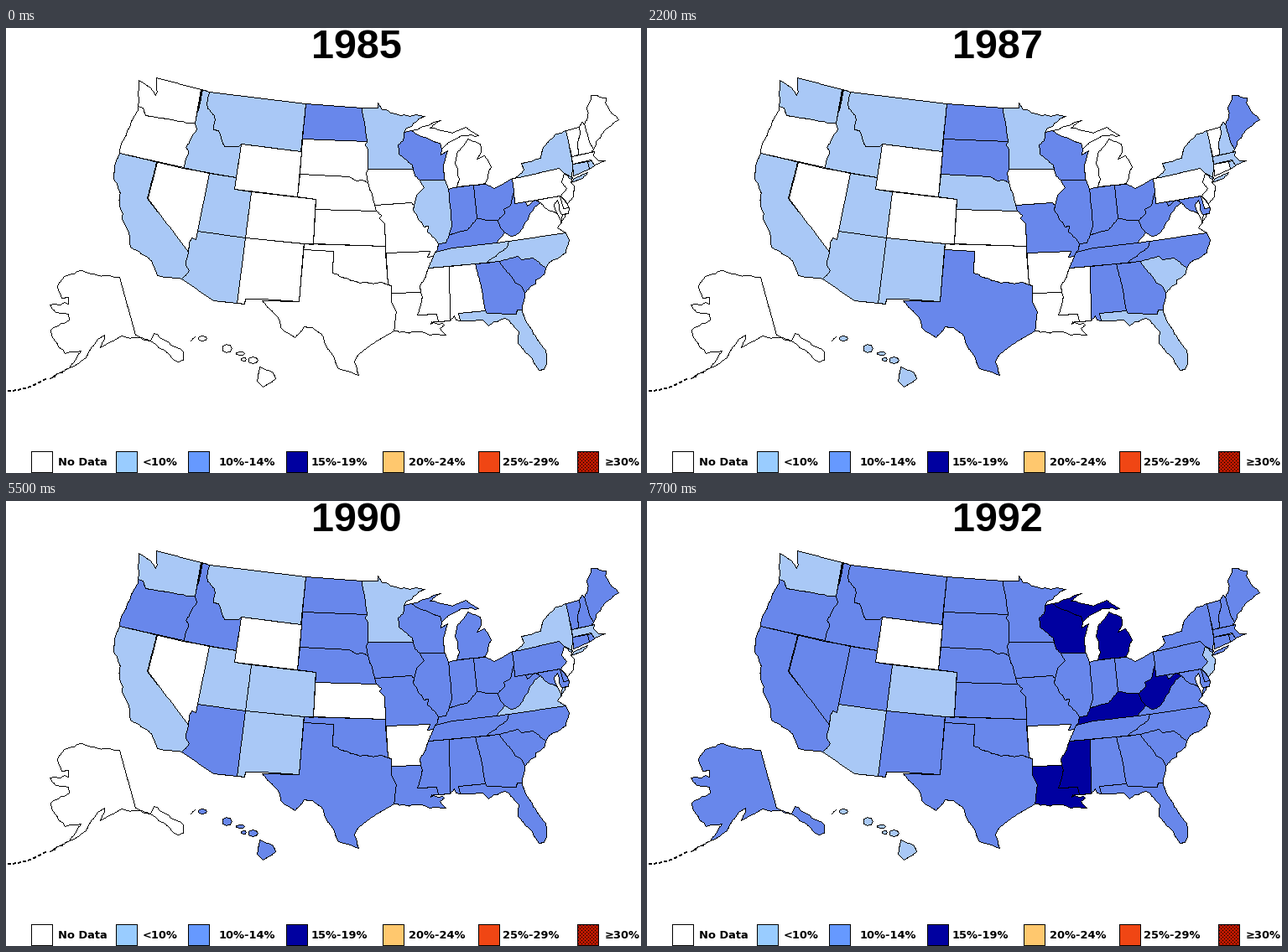
Recreate the animation shown at these times as a matplotlib script. Size 757 px wide and 531 px high, loop 8 s.

```python
import math
import numpy as np
import matplotlib.pyplot as plt
from matplotlib.animation import FuncAnimation
from matplotlib.patches import Polygon, Rectangle

W, H, DPI = 757, 531, 64
PX = 72 / DPI                      # one pixel in points
STEP, YEAR_MS, LOOP_MS = 100, 1100, 8000
FILLS = ["#ffffff", "#a9c8f6", "#6887eb", "#0000a0"]

# States that take a new level in each year; the others keep theirs
CHANGES = [
    {1: "ID MT CA UT AZ MN IL TN FL NC NY CT RI", 2: "ND WI IN OH KY WV GA SC"},
    {0: "CT", 1: "NM HI MA SC", 2: "AL MO IL TN"},
    {1: "WA NE NH", 2: "SD TX ME MD NC"},
    {1: "ND OK TX TN GA CT", 2: "CA AZ IA MI AL FL SC MA"},
    {1: "SD CA AZ AL FL ME MD MA", 2: "WA OR ND NE MN OK TX TN VA PA"},
    {1: "WA MN CO VA MA", 2: "ID SD AZ LA MS AL GA FL ME MD DE VT NH CT RI HI"},
    {1: "GA RI NJ", 2: "CA MN AR VA NY AK", 3: "LA MS MI WV"},
    {0: "AR", 1: "AZ HI", 2: "MT NV UT NM KS GA MA RI", 3: "WI KY"},
]

fig = plt.figure(figsize=(W / DPI, H / DPI), dpi=DPI, facecolor="white")
ax = fig.add_axes([0, 0, 1, 1])
ax.set_xlim(-0.5, W - 0.5)
ax.set_ylim(H - 0.5, -0.5)
ax.axis("off")

rng = np.random.default_rng(4)
ink = np.zeros((H, W, 4))          # crisp one-pixel black lines
shapes = {}                        # state -> its patches


def stroke(points):
    for (x0, y0), (x1, y1) in zip(points, points[1:]):
        n = int(max(abs(x1 - x0), abs(y1 - y0))) + 1
        xs = np.rint(np.linspace(x0, x1, n + 1)).astype(int)
        ys = np.rint(np.linspace(y0, y1, n + 1)).astype(int)
        ink[ys, xs, 3] = 1


def rough(*points, amp=0.8, step=5):
    """Coast or river: key points joined by slightly ragged lines."""
    line = [points[0]]
    for (x0, y0), (x1, y1) in zip(points, points[1:]):
        n = max(1, int(math.hypot(x1 - x0, y1 - y0) / step))
        for k in range(1, n):
            dx, dy = rng.normal(0, amp, 2)
            line.append((x0 + (x1 - x0) * k / n + dx, y0 + (y1 - y0) * k / n + dy))
        line.append((x1, y1))
    return line


def state(name, *rings):
    for ring in rings:
        patch = Polygon(ring, closed=True, fc="white", lw=0)
        ax.add_patch(patch)
        shapes.setdefault(name, []).append(patch)
        stroke(list(ring) + [ring[0]])


def island(x, y, rx, ry):
    turns = np.arange(7) * math.tau / 7
    return [(x + rx * math.cos(t), y + ry * math.sin(t)) for t in turns]


# Ragged borders shared by two states
wa_or = rough((157, 93), (163, 95), (166, 104), (185, 107), (225, 113), amp=0.5)
or_id = rough((225, 113), (227, 121), (214, 142), (217, 146), (211, 167))
id_mt = rough((242, 76), (239, 90), (249, 109), (247, 121), (253, 122),
              (260, 141), (277, 141), (280, 138))
nv_az = [(217, 267), (218, 256), (221, 250), (226, 252), (228, 242)]
ca_az = rough((217, 267), (214, 283), (218, 289), (209, 299))
nd_mn = rough((424, 95), (428, 122), (430, 135), amp=0.4)
sd_mn = [(430, 135), (428, 139), (431, 144), (431, 168)]
sd_ia = [(431, 168), (429, 173), (431, 184)]
sd_ne = [(350, 174), (409, 177), (417, 182), (424, 181), (431, 184)]
ne_ia = rough((431, 184), (436, 198), (439, 211), amp=0.5)
ks_mo = [(441, 218), (447, 223), (445, 227), (451, 233), (452, 260)]
ok_tx = [(354, 264), (390, 266), (389, 292)] + rough(
    (389, 292), (405, 298), (422, 304), (447, 303), (455, 306), amp=0.6)
tx_la = rough((459, 316), (459, 326), (465, 338), (462, 361), amp=0.5)
mn_wi = rough((474, 124), (473, 134), (467, 139), (468, 150), (484, 163),
              (485, 168))
wi_ia = [(485, 168), (487, 176), (493, 181)]
ia_il = rough((493, 181), (498, 190), (489, 199), (486, 211), amp=0.5)
mo_il = rough((486, 211), (485, 217), (498, 237), (503, 236), (502, 243),
              (515, 257), amp=0.6)
mo_ky = [(515, 257), (514, 264), (511, 267)]
mo_ar = [(509, 272), (502, 273), (505, 266), (452, 268)]
ar_ms = rough((503, 286), (493, 307), (494, 315))
la_ms = rough((494, 315), (495, 325), (490, 342)) + [(513, 341), (515, 350)]
il_in = rough((527, 192), (530, 222), (531, 236), (528, 246), amp=0.3)
il_ky = [(528, 246), (524, 256), (515, 257)]
in_ky = rough((528, 246), (549, 241), (561, 227))
oh_ky = rough((561, 227), (573, 229), (586, 229))
oh_wv = rough((586, 229), (602, 208), (605, 195))
ky_wv = [(586, 229), (588, 236), (594, 244)]
pa_wv = [(605, 195), (606, 209), (619, 207)]
wv_md = [(619, 207), (621, 212), (630, 205), (637, 208)]
wv_va = rough((594, 244), (602, 248), (612, 243), (618, 232), (630, 213),
              (637, 208))
ky_tn = [(511, 267), (532, 262), (584, 256)]
tn_nc = rough((599, 254), (597, 261), (572, 280))
nc_sc = [(587, 278), (610, 272), (614, 276), (628, 274), (643, 286)]
ga_sc = rough((587, 278), (604, 299), (618, 316))
al_ga = [(559, 281), (567, 312), (569, 327), (571, 337)]
al_fl = [(571, 337), (539, 340), (541, 349)]
ga_fl = [(571, 337), (573, 340), (608, 341), (609, 336), (615, 336)]
wi_mi = rough((483, 122), (490, 127), (517, 137), (519, 144), amp=0.5)
pa_nj = [(665, 173), (662, 184), (668, 191), (661, 200)]
md_va = rough((637, 208), (641, 213), (657, 221))
ca_nv = [(180, 159), (169, 203), (217, 267)]

# West
state("WA", wa_or + [(232, 73), (179, 59)] + rough(
    (179, 59), (179, 69), (178, 80), (172, 71), (158, 62), (157, 93), amp=0.6))
state("OR", wa_or + or_id + rough((135, 149), (137, 137), (151, 107), (157, 93)))
state("ID", or_id[::-1] + [(233, 73)] + id_mt + [(274, 178)])
state("MT", id_mt + [(351, 147), (357, 90)])
state("WY", [(280, 138), (352, 147), (347, 201), (272, 192)])
state("CA", ca_nv + ca_az + rough(
    (209, 299), (180, 295), (174, 280), (158, 266), (148, 261), (147, 250),
    (138, 227), (133, 190), (128, 180), (129, 168), (135, 149)))
state("NV", ca_nv + nv_az + [(242, 173)])
state("UT", [(242, 173), (274, 178), (272, 192), (292, 195), (285, 250),
             (228, 242)])
state("CO", [(292, 195), (369, 204), (366, 258), (285, 250)])
state("AZ", nv_az[::-1] + ca_az + [(247, 325), (275, 328), (285, 250)])
state("NM", [(285, 250), (355, 257), (349, 326), (305, 323), (285, 323),
             (284, 329), (275, 328)])

# Plains
state("ND", [(357, 90)] + nd_mn + [(353, 132)])
state("SD", [(353, 132)] + sd_mn + sd_ia + sd_ne[::-1])
state("NE", sd_ne + ne_ia + [(441, 218), (368, 216), (369, 204), (347, 201)])
state("KS", [(368, 216)] + ks_mo + [(366, 257)])
state("OK", [(355, 257), (452, 260), (455, 306)] + ok_tx[::-1])
state("TX", ok_tx + [(459, 307)] + tx_la + rough(
    (462, 361), (443, 372), (420, 389), (415, 398), (420, 414), (396, 406),
    (391, 393), (381, 379), (375, 364), (365, 357), (355, 356), (344, 369),
    (327, 357), (325, 347), (305, 325), amp=0.6) + [(349, 326)])
state("MN", nd_mn + sd_mn + mn_wi[::-1] + rough((474, 124), (485, 113), (499, 105))
      + rough((499, 105), (470, 104), (448, 97), (443, 89), (443, 95)))
state("IA", sd_ia + ne_ia + [(483, 208)] + ia_il[::-1] + wi_ia[::-1])
state("MO", [(439, 211), (483, 208)] + mo_il + mo_ky + mo_ar + ks_mo[::-1])
state("AR", mo_ar + [(455, 306), (459, 307), (459, 316)] + ar_ms[::-1])
state("LA", tx_la[::-1] + la_ms + rough(
    (515, 350), (506, 353), (522, 354), (517, 358), (524, 366), (507, 366),
    (489, 362), (462, 361), amp=1.2, step=4))

# Great Lakes
state("WI", mn_wi + wi_ia + [(522, 181), (521, 163)] + rough(
    (521, 163), (526, 146), (518, 151), amp=0.5) + wi_mi[::-1])
state("IL", ia_il + mo_il + il_ky[::-1] + il_in[::-1] + [(523, 181)])
state("IN", il_in + in_ky + [(557, 187), (533, 190)])
state("MI", wi_mi + rough(
    (519, 144), (531, 134), (543, 128), (563, 128), (548, 118), (532, 125),
    (505, 119), (518, 110), (502, 116), (483, 122), amp=0.6),
    rough((537, 189), (540, 180), (535, 161), (537, 149), (546, 139), (550, 132),
          (565, 138), (566, 148), (561, 156), (570, 152), (578, 166), (571, 185),
          (557, 187), amp=0.6))
state("OH", [(557, 187)] + oh_ky + oh_wv + rough(
    (603, 179), (590, 187), (581, 191), (571, 186), amp=0.5))

# South
state("KY", mo_ky[::-1] + il_ky[::-1] + in_ky + oh_ky + ky_wv + ky_tn[::-1])
state("TN", ky_tn + tn_nc + [(559, 281), (503, 286), (509, 272)])
state("MS", ar_ms + la_ms + [(529, 349), (528, 284)])
state("AL", [(528, 284)] + al_ga + al_fl + [(536, 348), (534, 343), (529, 349)])
state("GA", al_ga + ga_fl + rough((615, 336), (618, 316)) + ga_sc[::-1])
state("FL", al_fl[::-1] + ga_fl + rough(
    (615, 336), (620, 351), (643, 385), (644, 400), (641, 407), (635, 408),
    (623, 390), (610, 376), (611, 362), (595, 346), (575, 355), (568, 348),
    (541, 349)))
state("SC", ga_sc + rough((618, 316), (637, 297), (643, 286)) + nc_sc[::-1])
state("NC", tn_nc + nc_sc + rough(
    (643, 286), (652, 276), (667, 268), (671, 253), (667, 244), amp=1.5))
state("WV", oh_wv + pa_wv + wv_md + wv_va[::-1] + ky_wv[::-1])
state("VA", wv_va + md_va + rough(
    (657, 221), (662, 231), (657, 238), (667, 244), amp=1.2)
    + [(599, 254), (584, 256)], [(663, 222), (667, 222), (661, 233)])
state("MD", wv_md + md_va + rough(
    (657, 221), (653, 210), (657, 205), (662, 222), amp=0.6)
    + [(670, 221), (671, 214), (664, 215), (660, 200)])
state("DE", [(660, 200), (664, 203), (671, 214), (664, 215)])

# Northeast
state("PA", pa_wv + pa_nj[::-1] + [(659, 167), (611, 178), (603, 179)])
state("NJ", pa_nj + [(669, 209), (676, 201), (677, 188), (673, 184), (675, 178)])
state("NY", rough((607, 178), (617, 169), (614, 161), (637, 155), (640, 142),
                  (655, 126), (667, 122), amp=0.4)
      + [(670, 135), (675, 162), (674, 181), (665, 173), (659, 167), (611, 178)],
      [(673, 184), (677, 179), (693, 172), (687, 179)])
vt_nh = [(683, 118), (684, 125), (681, 137), (682, 151)]
nh_me = [(689, 114), (695, 135), (700, 145)]
state("VT", [(667, 122)] + vt_nh + [(674, 153), (670, 135)])
state("NH", vt_nh[::-1] + [(686, 112)] + nh_me + [(697, 148)])
state("ME", nh_me + rough(
    (700, 145), (703, 135), (715, 120), (730, 109), (719, 98), (715, 83),
    (697, 80), (692, 95), (693, 107), (689, 114)))
state("MA", [(674, 153), (697, 148), (701, 147), (700, 152), (706, 158),
             (714, 158), (701, 163), (697, 157), (675, 162)])
state("CT", [(675, 162), (693, 159), (695, 168), (676, 176)])
state("RI", [(693, 159), (698, 158), (701, 164), (695, 168)])

# Alaska with its island chain, Hawaii
state("AK", rough((90, 289), (102, 293), (135, 297)) + [(154, 366)] + rough(
    (154, 366), (172, 373), (176, 364), (211, 386), (211, 396), (204, 398),
    (172, 373), (153, 369), (137, 367), (112, 381), (117, 366), (109, 371),
    (95, 393), (52, 418), (75, 405), (89, 385), (70, 388), (54, 367),
    (53, 360), (75, 348), (74, 341), (59, 339), (52, 330), (74, 329),
    (74, 321), (66, 322), (61, 307), (69, 296), (90, 289)))
for x in range(2, 47, 6):
    y = 432 - 14 * (x / 46) ** 2
    for dy in (0, 1):
        stroke([(x, y + dy), (x + 3, y + dy - x / 30)])
state("HI", [(220, 373), (225, 368)], island(234, 370, 5, 3),
      island(263, 382, 6, 5), island(279, 388, 5, 2), island(283, 395, 3, 2),
      island(294, 396, 6, 4),
      rough((302, 404), (318, 411), (321, 418), (306, 428), (299, 421), amp=0.4))

# The two double-drawn borders
stroke([(234, 73), (229, 98)])
stroke([(179, 160), (168, 203), (180, 219)])

# Legend: box left, colour, text left, label
LEGEND = [(30, "#ffffff", 62, "No Data"), (131, "#99ccff", 163, "<10%"),
          (217, "#6699ff", 254, "10%-14%"), (334, "#0000a0", 364, "15%-19%"),
          (449, "#ffc86e", 480, "20%-24%"), (563, "#f04614", 592, "25%-29%"),
          (681, "#b81800", 714, "≥30%")]
TOP, SIDE = 505, 25
for x, color, tx, label in LEGEND:
    ax.add_patch(Rectangle((x, TOP), SIDE, SIDE, fc=color, lw=0))
    r, b = x + SIDE, TOP + SIDE
    stroke([(x, TOP), (r, TOP), (r, b), (x, b), (x, TOP)])
    ax.text(tx - 0.5, 521.5, label, family="DejaVu Sans", weight="bold",
            size=13 * PX, va="baseline")
for y in range(TOP + 1, TOP + SIDE, 2):
    ink[y, 682 + y % 4:706:4, 3] = 1

ax.imshow(ink, extent=(-0.5, W - 0.5, H - 0.5, -0.5), interpolation="nearest",
          aspect="auto", zorder=3)
title = ax.text(417.5, 36, "", family="Liberation Sans", weight="bold",
                size=48.5 * PX, ha="center", va="baseline")


def update(i):
    year = i * STEP // YEAR_MS
    level = dict.fromkeys(shapes, 0)
    for change in CHANGES[:year + 1]:
        for value, names in change.items():
            level.update(dict.fromkeys(names.split(), value))
    for name, patches in shapes.items():
        for patch in patches:
            patch.set_facecolor(FILLS[level[name]])
    title.set_text(str(1985 + year))
    return [title]


anim = FuncAnimation(fig, update, frames=LOOP_MS // STEP, interval=STEP,
                     init_func=lambda: update(0), repeat=True, repeat_delay=0)
plt.show()
```
